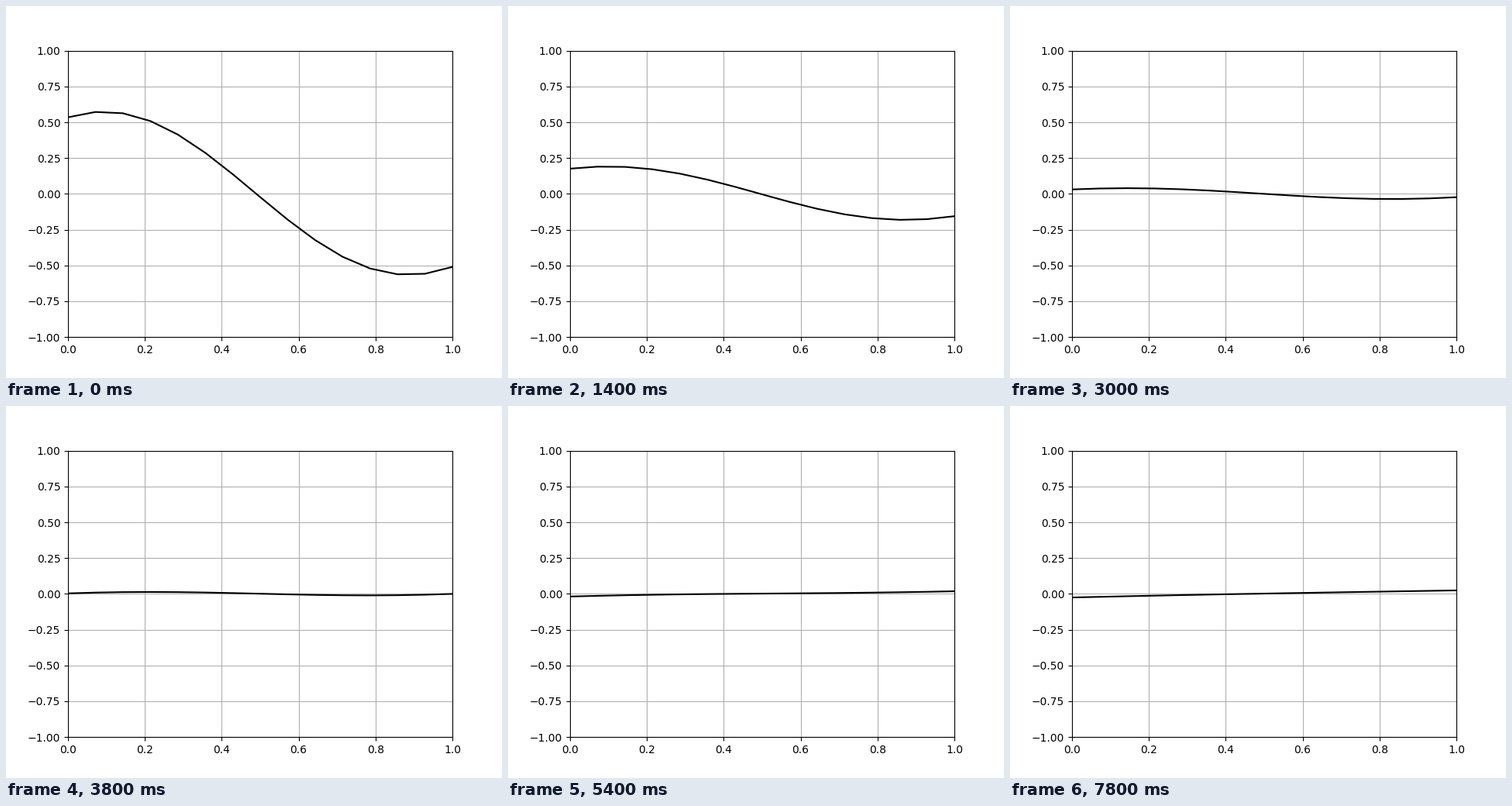
Write a matplotlib script that moves like this. It is 640 px wide and 480 px high and loops after 8000 ms.

```python
import numpy as np
import matplotlib.pyplot as plt
from matplotlib.animation import FuncAnimation

FRAMES = 40
INTERVAL = 200
x = np.linspace(0, 1, 15)
z = 2 * x - 1


def profile(n):
    """Decaying heat profile at step n, settling to a faint slope."""
    amp = 0.59 * np.exp(-0.163 * n + 0.11 * (1 - np.exp(-n / 4)))
    odd = -amp * np.sin(1.95 * z) + 0.0258 * z
    slow = np.exp(-(n / 14) ** 2)
    fast = np.exp(-0.43 * n)
    even = 0.002 - 0.006 * slow + (0.0195 * slow - 0.0025) * z ** 2
    even += fast * (0.009 * np.cos(2 * np.pi * x) - 0.0097)
    return odd + even


fig, ax = plt.subplots(figsize=(6.4, 4.8), dpi=100)
ax.set_xlim(0, 1)
ax.set_ylim(-1, 1)
ax.grid(True)
line, = ax.plot(x, profile(0), color="black", lw=1.5)


def update(n):
    line.set_ydata(profile(n))
    return line,


anim = FuncAnimation(fig, update, frames=FRAMES, interval=INTERVAL,
                     repeat=True, repeat_delay=0)
plt.show()
```
